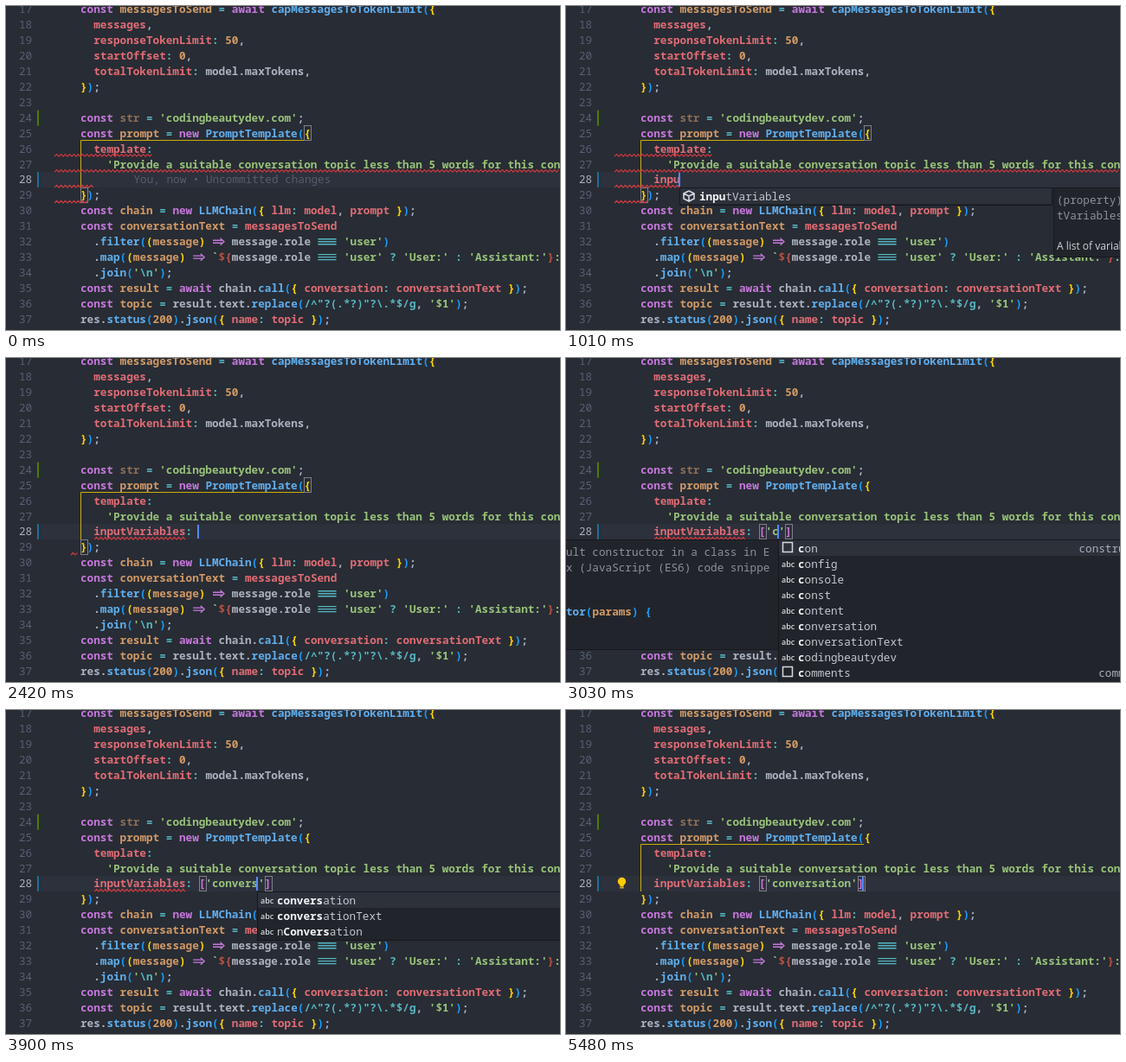
An HTML page with a canvas that plays this animation: 640x375 px, repeating every 5.74 s.

```html
<!DOCTYPE html>
<html lang="en">
<head>
<meta charset="utf-8">
<title>Code editor</title>
<style>
  html, body { margin: 0; width: 100%; height: 100%; overflow: hidden; background: #282c34; }
  canvas { display: block; }
</style>
</head>
<body>
<canvas id="stage" width="640" height="375"></canvas>
<script>
const ctx = document.getElementById('stage').getContext('2d');
const LOOP = 5740, CELL = 7.6, LEFT = 55.6, PITCH = 17.95, FIRST = 17, ACTIVE = 28;
const FACE = '12.667px "Noto Sans Mono", monospace';
const MONO = '500 ' + FACE, CODE = '600 ' + FACE, BOLD = 'bold ' + FACE;
const SANS = '"Open Sans", sans-serif';
const GREY = '#abb2bf', RED = '#e06c75', ORANGE = '#d19a66', GOLD = '#ffd700', CYAN = '#56b6c2', PURPLE = '#c678dd';
const BRACKETS = ['#179fff', GOLD, '#da70d6'];

const code = String.raw`const messagesToSend = await capMessagesToTokenLimit({
  messages,
  responseTokenLimit: 50,
  startOffset: 0,
  totalTokenLimit: model.maxTokens,
});

const str = 'codingbeautydev.com';
const prompt = new PromptTemplate({
  template:
    'Provide a suitable conversation topic less than 5 words for this conversation',
@
});
const chain = new LLMChain({ llm: model, prompt });
const conversationText = messagesToSend
  .filter((message) => message.role === 'user')
  .map((message) => ~$\{message.role === 'user' ? 'User:' : 'Assistant:'}: ~)
  .join('\n');
const result = await chain.call({ conversation: conversationText });
const topic = result.text.replace(/^"?(.*?)"?\.*$/g, '$1');
res.status(200).json({ name: topic });`.replace('$\\{', '${').replace(/~/g, '`').split('\n');

// Content of the edited line over time; "|" is the cursor.
const edits = [[0, '|'], [470, 'i|'], [680, 'in|'], [880, 'inp|'], [1010, 'inpu|'], [1150, 'input|'],
  [1540, 'inputVariables|'], [2070, 'inputVariables:|'], [2350, 'inputVariables: |'],
  [2620, 'inputVariables: [|]'], [2890, "inputVariables: ['|']"]];
[3030, 3150, 3290, 3630, 3760, 3830, 3900, 4170, 4240, 4380, 4520, 4660].forEach((time, i) =>
  edits.push([time, `inputVariables: ['${'conversation'.slice(0, i + 1)}|']`]));
edits.push([5010, "inputVariables: ['conversation'|]"], [5220, "inputVariables: ['conversation']|"]);

// Suggestions: label, icon, text at the right
const keyItems = [['inputVariables', 'cube'], ['if', 'box', 'If Statement'], ['ifelse', 'box', 'If-Else Statement'],
  ['instanceof', 'abc'], ['import', 'box', 'import'], ['imp', 'box', 'importEverything'],
  ['interface', 'abc'], ['item', 'abc'], ['imn', 'box', 'import']];
const wordItems = [['con', 'box', 'constructor'], ['config', 'abc'], ['console', 'abc'], ['const', 'abc'],
  ['content', 'abc'], ['conversation', 'abc'], ['conversationText', 'abc'], ['codingbeautydev', 'abc'],
  ['comments', 'box', 'comments'], ['nConversation', 'abc']];

const rules = [
  ['#98c379', /'(?=\\n)|'[^'\\]*'|'|: `|`/],
  [CYAN, /\\n|\/\^.*\/g|===|[=?:](?!>)/],
  [PURPLE, /\b(?:const|await|new)\b|=>/],
  ['#be5046', /\$\{|\}(?=: `)/],
  ['#8b6f56', /\bstr\b/],
  [ORANGE, /\b\d+\b|(?<=const )\w+|(?<=\()\w+(?=\))/],
  ['#61afef', /\w+(?=\()/],
  [GREY, /\w+(?=\.)|(?<=\.)\w+/],
  [RED, /\w+/],
  ['bracket', /[()[\]{}]/],
  [GREY, /\S/]
];
const lexer = new RegExp(rules.map(rule => `(${rule[1].source})`).join('|'), 'g');

const colX = col => LEFT + col * CELL;
const rowY = line => 3.5 + (line - FIRST) * PITCH;

function rect(x, y, w, h, fill) {
  ctx.fillStyle = fill;
  ctx.fillRect(x, y, w, h);
}

function outline(x, y, w, h, color, width = 1) {
  ctx.strokeStyle = color;
  ctx.lineWidth = width;
  ctx.strokeRect(Math.round(x) + .5, Math.round(y) + .5, w, h);
}

function stroke(color, width, ...paths) {
  ctx.strokeStyle = color;
  ctx.lineWidth = width;
  ctx.beginPath();
  for (const path of paths) path.forEach(([x, y], i) => i ? ctx.lineTo(x, y) : ctx.moveTo(x, y));
  ctx.stroke();
}

function text(str, x, y, color, font = MONO, align = 'left') {
  ctx.font = font;
  ctx.textAlign = align;
  ctx.fillStyle = color;
  ctx.fillText(str, x, y + 4.5);
}

function squiggle(from, to, line) {
  const y = rowY(line) + 7.8, points = [];
  for (let x = from, i = 0; x <= to; x += 2.5, i++) points.push([x, y + (i % 2 ? -1.3 : 1.3)]);
  stroke('#d0393e', 1.2, points);
}

function drawToken(str, x, y, color) {
  if (str === '=>') {
    stroke(color, 1.3, [[x + 1, y - 1.5], [x + 12, y - 1.5]], [[x + 1, y + 1.5], [x + 12, y + 1.5]],
      [[x + 9.5, y - 4], [x + 14, y], [x + 9.5, y + 4]]);
  } else if (str === '===') {
    stroke(color, 1.3, ...[-3, 0, 3].map(d => [[x + .8, y + d], [x + 22, y + d]]));
  } else text(str, x, y, color, CODE);
}

// Draws one highlighted line and returns the bracket depth after it.
function drawLine(content, x, y, depth) {
  for (const match of content.matchAll(lexer)) {
    let color = rules[match.slice(1).findIndex(Boolean)][0];
    if (color === 'bracket') {
      const opens = '([{'.includes(match[0]);
      color = BRACKETS[(opens ? depth++ : --depth) % 3];
    }
    drawToken(match[0], x + match.index * CELL, y, color);
  }
  return depth;
}

function drawCode(edited) {
  let depth = 0;
  code.forEach((source, i) => {
    const line = FIRST + i, y = rowY(line);
    text(line, 15, y, line === ACTIVE ? GREY : '#566073');
    depth = drawLine(source === '@' ? '  ' + edited : source, colX(4), y, depth);
  });
}

function matchIndexes(label, typed) {
  const found = [];
  let from = 0;
  for (const letter of typed) {
    const at = label.toLowerCase().indexOf(letter, from);
    if (at < 0) return null;
    found.push(at);
    from = at + 1;
  }
  return found;
}

function panel(x, y, w, h) {
  rect(x, y, w, h, '#21252b');
  outline(x, y, w, h, '#16181d');
}

function icon(kind, x, y) {
  if (kind === 'abc') text('abc', x + 4, y - 1, '#d5d9e0', '600 9px ' + SANS);
  else if (kind === 'box') outline(x + 5, y - 7, 11, 11, '#d5d9e0', 1.5);
  else {
    const cx = x + 11;
    stroke('#d5d9e0', 1.6,
      [[cx, y - 6], [cx + 6, y - 3], [cx + 6, y + 3], [cx, y + 6], [cx - 6, y + 3], [cx - 6, y - 3], [cx, y - 6]],
      [[cx - 6, y - 3], [cx, y], [cx + 6, y - 3]], [[cx, y], [cx, y + 6]]);
  }
}

function drawPopup(items, typed, x) {
  const shown = items.filter(item => matchIndexes(item[0], typed));
  panel(x, 210, 430, shown.length * 18 + 2);
  rect(x + 1, 211, 429, 18, '#2c313a');
  shown.forEach(([label, kind, detail], row) => {
    const y = 220 + row * 18, bold = matchIndexes(label, typed);
    icon(kind, x, y);
    [...label].forEach((letter, i) => {
      const hit = bold.includes(i);
      text(letter, x + 23 + i * CELL, y, hit ? '#f4f6f8' : '#c3c8d1', hit ? BOLD : MONO);
    });
    if (detail) text(detail, x + 431, y, '#a9afba', MONO, 'right');
  });
}

function drawKeyDetails(x) {
  panel(x, 210, 200, 80);
  text('(property)', x + 4, 224, '#8b929e');
  text('tVariables', x + 4, 242, '#8b929e');
  text('A list of variable names', x + 4, 277, '#d0d4da', '12px ' + SANS);
}

function drawSnippetDetails(right) {
  panel(-2, 210, right + 2, 127);
  text('ult constructor in a class in E', 0, 224, '#8b929e');
  text('x (JavaScript (ES6) code snippe', 0, 242, '#8b929e');
  drawLine('tor(params) {', 0, 293.5, 0);
  stroke(GREY, 1.2, [[246, 220], [254, 228]], [[254, 220], [246, 228]]);
}

function drawBulb() {
  ctx.fillStyle = '#ffcc00';
  ctx.beginPath();
  ctx.arc(64.5, 198.5, 4.7, 0, Math.PI * 2);
  ctx.fill();
  rect(62.3, 201, 4.4, 3.5, '#ffcc00');
  rect(62.3, 205, 4.4, 1.5, '#d9b23a');
}

function drawMarks(t, edited) {
  const bracketBox = (col, line) => outline(colX(col), rowY(line) - 9, 8, 17, '#7f8089');
  if (t < 2620 || t >= 5220) stroke('#cdae0a', 1, [[344, 155.5], [86.5, 155.5], [86.5, 210]]);
  if (t < 2620) {
    bracketBox(38, 25);
    bracketBox(4, 29);
  } else {
    bracketBox(6 + edited.indexOf('['), ACTIVE);
    bracketBox(6 + edited.indexOf(']'), ACTIVE);
  }
  if (t < 1610) {
    squiggle(56, 170, 26);
    squiggle(56, 640, 27);
    squiggle(56, colX(6 + edited.length), 28);
    squiggle(56, 94, 29);
  } else if (t < 5010) squiggle(102, 209, ACTIVE);
  if (t >= 2070 && t < 2620) squiggle(75, 83, 29);
}

function draw(t) {
  const state = edits.filter(edit => edit[0] <= t).pop()[1];
  const edited = state.replace('|', ''), cursorX = colX(6 + state.indexOf('|')) - 1;

  rect(0, 0, 640, 375, '#282c34');
  rect(40, 192, 600, 18, '#2c313c');
  rect(36, 120.5, 2, 18, '#487e02');
  rect(36, 192, 2, 18, '#1b6f9a');
  drawCode(edited);
  drawMarks(t, edited);

  if (t < 400) text('You, now • Uncommitted changes', 147.5, rowY(ACTIVE), '#565d6b');
  else rect(Math.round(cursorX) - 1, 193, 2, 16, '#528bff');
  if (t >= 4860) drawBulb();

  const popupX = Math.round(cursorX);
  if (t >= 470 && t < 1540) {
    drawPopup(keyItems, edited, popupX);
    if (t >= 880) drawKeyDetails(popupX + 432);
  }
  if (t >= 3030 && t < 4860) {
    if (t < 3630) drawSnippetDetails(popupX);
    drawPopup(wordItems, edited.match(/'(.*)'/)[1], popupX);
  }
}

const start = performance.now();
function tick() {
  draw((performance.now() - start) % LOOP);
  requestAnimationFrame(tick);
}
tick();
</script>
</body>
</html>
```
